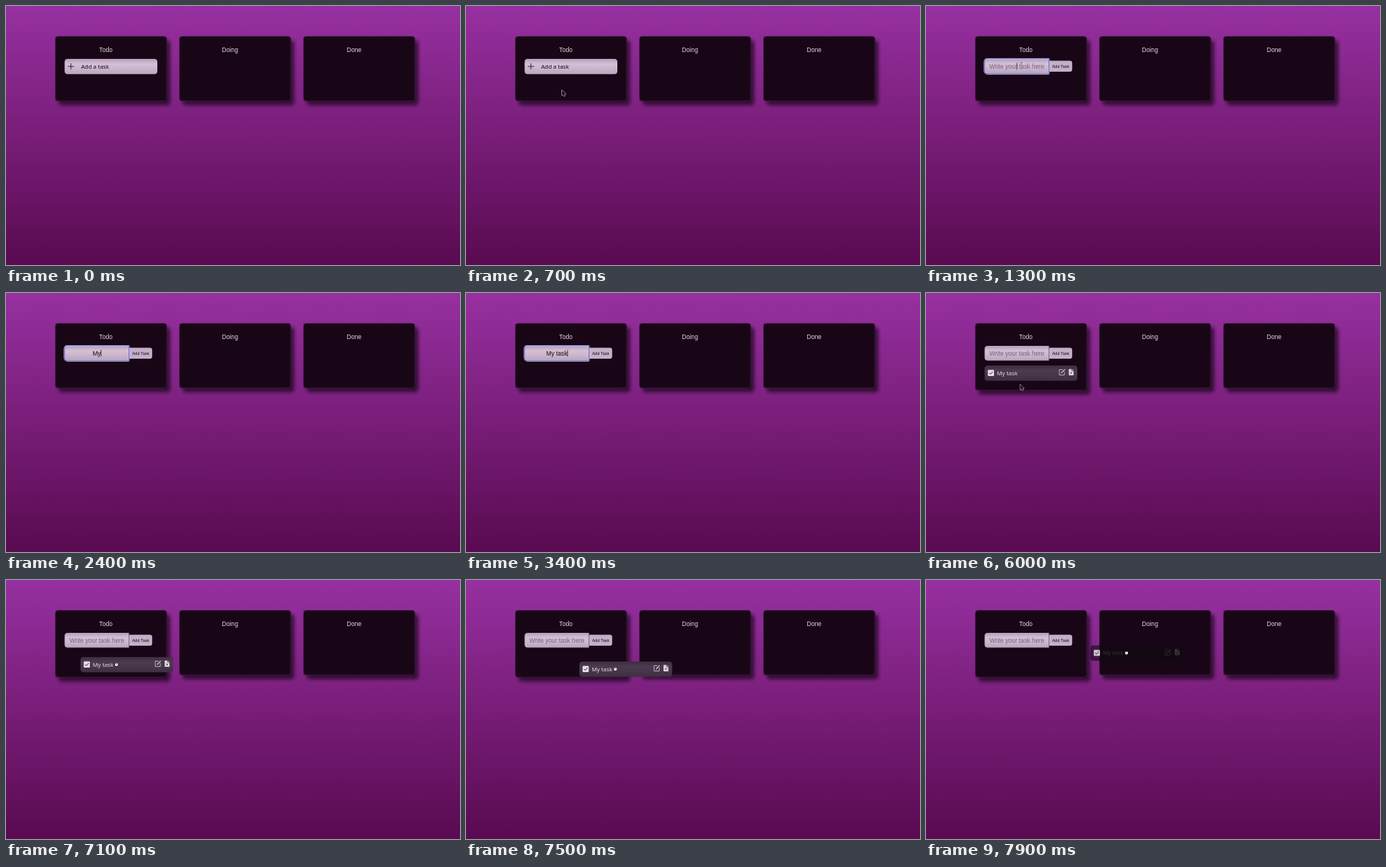
Write an HTML page with a canvas that moves like this. It is 600 px wide and 343 px high and loops after 8000 ms.

```html
<!DOCTYPE html>
<html lang="en">
<head>
<meta charset="utf-8">
<title>Task board</title>
<style>
html, body { margin: 0; width: 100%; height: 100%; overflow: hidden; background: #78207a; }
canvas { display: block; width: 600px; height: 343px; }
</style>
</head>
<body>
<canvas id="stage"></canvas>
<script>
const W = 600, H = 343, LOOP = 8000, STEP = 100;
const SANS = '"Liberation Sans", Arial, sans-serif';
const NOTO = '"Noto Sans", "Open Sans", sans-serif';
const TASK = 'My task';

// Moments of the story, in ms.
const OPEN = 1100, TYPE = 2200, KEY = 150, REACH = 3800, SUBMIT = 4300;
const LEAVE = 5300, BACK = 5800, GRAB = 6500, DRAG = 6800, END = 7900;

const canvas = document.getElementById('stage');
const ctx = canvas.getContext('2d');
const ratio = window.devicePixelRatio || 1;
canvas.width = W * ratio;
canvas.height = H * ratio;
ctx.scale(ratio, ratio);

const part = (t, from, to) => Math.min(1, Math.max(0, (t - from) / (to - from)));
const smooth = p => p * p * (3 - 2 * p);

// The pointer's place is its entry point plus each eased move made so far.
function pointerAt(t) {
  const enter = smooth(part(t, 0, 900));
  const reach = smooth(part(t, REACH, SUBMIT));
  const leave = smooth(part(t, LEAVE, BACK));
  const back = part(t, BACK, 6300);
  return [
    133 - 7 * enter + 42 * reach - 44 * leave + back,
    336 - 257 * enter + 4 * reach + 48 * leave - 25 * back
  ];
}

// The drag speeds up sideways, sinks a little and lifts at the end.
function dragAt(t) {
  const p = part(t, DRAG, END);
  return [140 * p ** 1.46, 22 * p - 31.4 * p ** 6];
}

function vertical(y, h, colors) {
  const g = ctx.createLinearGradient(0, y, 0, y + h);
  colors.forEach((c, i) => g.addColorStop(i / (colors.length - 1), c));
  return g;
}

function box(x, y, w, h, r, fill, stroke, width = 1) {
  ctx.beginPath();
  ctx.roundRect(x, y, w, h, r);
  if (fill) { ctx.fillStyle = fill; ctx.fill(); }
  if (stroke) { ctx.strokeStyle = stroke; ctx.lineWidth = width; ctx.stroke(); }
}

function label(text, x, y, size, color, family = SANS, align = 'left') {
  ctx.font = size + 'px ' + family;
  ctx.textAlign = align;
  ctx.fillStyle = color;
  ctx.fillText(text, x, y);
}

function line(color, width, d) {
  ctx.strokeStyle = color;
  ctx.lineWidth = width;
  ctx.stroke(new Path2D(d));
}

function shape(d, fill, stroke, width) {
  ctx.lineJoin = 'round';
  if (stroke) line(stroke, width, d);
  ctx.fillStyle = fill;
  ctx.fill(new Path2D(d));
}

function column(x, title, h) {
  ctx.save();
  ctx.shadowColor = 'rgba(24, 6, 26, .75)';
  ctx.shadowOffsetX = 4.5 * ratio;
  ctx.shadowOffsetY = 5.5 * ratio;
  ctx.shadowBlur = 5 * ratio;
  box(x, 40, 147.5, h, 4, '#180617');
  ctx.restore();
  box(x + .25, 40.25, 147, h - .5, 4, null, '#4b2450', .6);
  label(title, x + 67, 61, 8.2, '#dcd3dd', SANS, 'center');
}

const light = ['#b49db8', '#d4c0d6', '#c9b4cc', '#bba5bf'];

function addButton() {
  box(77.5, 70, 122.5, 20.3, 4, vertical(70, 20.3, light));
  line('#2a1c2c', .9, 'M81.7 80H90M85.8 75.9V84.1');
  label('Add a task', 99.3, 82.8, 7.5, '#170b18', NOTO);
}

function form(t) {
  const focused = t < SUBMIT;
  const keys = focused ? Math.max(0, Math.ceil((t - TYPE + 1) / KEY)) : 0;
  const text = TASK.slice(0, keys);

  box(162.8, 72.5, 30.4, 14.6, [0, 3, 3, 0], '#c5aec8');
  label('Add Task', 178, 81.7, 5.5, '#150818', SANS, 'center');
  box(77.5, 70, 85, 19.5, [4, 0, 0, 4], vertical(70, 19.5, light));
  if (focused) {
    box(77.3, 69.8, 85.2, 20, [4, 1, 1, 4], null, '#d8d3ee', 1.7);
    box(77.3, 69.8, 85.2, 20, [4, 1, 1, 4], null, '#6670c4', 1.1);
  }
  if (text) label(text, 120, 82.7, 8.15, '#170c19', SANS, 'center');
  else label('Write your task here', 120, 82.7, 8.15, '#75647a', SANS, 'center');

  const typing = keys > 0 && keys <= TASK.length;
  const blink = (t - OPEN) % 1000 < 500;
  if (focused && (typing || blink)) {
    ctx.font = '8.15px ' + SANS;
    const x = 120.2 + ctx.measureText(text).width / 2;
    line('#170c19', .7, `M${x} 75.3V84.2`);
  }
}

function card(dx, dy, faded) {
  const ink = faded ? '#393239' : '#e2d8e4';
  const back = faded ? '#120c12' : '#443247';
  const fill = faded
    ? 'rgba(15, 11, 15, .6)'
    : vertical(0, 20.3, ['#3e2c41', '#4c3a4f', '#473549', '#3f2d42']);
  ctx.save();
  ctx.translate(77.5 + dx, 96 + dy);
  box(0, 0, 122.5, 20.3, 4, fill);

  box(4.2, 5.8, 8.2, 8.2, 1.2, faded ? '#cfc3d0' : '#e6dce8');
  line('#392a3b', 1, 'M6.1 9.9L7.7 11.6L10.7 8.1');
  label(TASK, 16.3, 12.7, 7.5, ink, NOTO);

  // Edit and delete icons.
  line(ink, .7, 'M103 5.5H98.7V12.6H105.5V8.3');
  line(ink, 1.1, 'M101.2 10.2L106 5.2');
  shape('M111.2 4.7H115.2L117.6 7.1V13H111.2Z', ink);
  line(back, .7, 'M115.1 4.7V7.2H117.6M113.1 8.7L115.6 11.2M115.6 8.7L113.1 11.2');
  ctx.restore();
}

const cursors = {
  arrow() {
    shape('M0 0V7.2L1.7 5.7L2.8 8.2L4 7.7L2.9 5.2H5.1Z', '#120812', '#e9e2ea', 1);
  },
  beam() {
    const d = 'M0 -3.8V3.8M-1.4 -4H1.4M-1.4 4H1.4';
    line('#e2d7e4', 1.3, d);
    line('#332636', .6, d);
  },
  hand() {
    shape('M-.5 0Q.3 -.8 .8 0V2.2L3.4 2.8Q4 3 3.9 3.8L3.2 6H.2L-1.9 3.4Q-1.6 2.5 -.5 3.1Z',
      '#e4dbe5', '#1c101e', 1);
  },
  grab() {
    shape('M-1.8 -1.1Q-1.4 -1.8 -.6 -1.5Q0 -2.2 .7 -1.6Q1.5 -1.9 2 -1V.6L1.1 2H-1L-2.1 .5Z',
      '#f4eef5', '#160b18', .8);
    line('#160b18', .4, 'M-.6 -.8V.1M.6 -.8V.1');
  }
};

function cursorKind(t, y) {
  if (t >= GRAB) return 'grab';
  if (t < OPEN) return y < 90 ? 'hand' : 'arrow';
  if (t < 4100) return 'beam';
  if (t < BACK) return y < 87 ? 'hand' : 'arrow';
  return y < 116 ? 'hand' : 'arrow';
}

function pointer(t, dx, dy) {
  const hidden = t < 100 || (t >= TYPE && t < REACH);
  if (hidden) return;
  const [x, y] = pointerAt(t);
  ctx.save();
  ctx.translate(x + dx, y + dy);
  cursors[cursorKind(t, y)]();
  ctx.restore();
}

function draw(t) {
  ctx.fillStyle = vertical(0, H, ['#9730a1', '#590a50']);
  ctx.fillRect(0, 0, W, H);

  ['Todo', 'Doing', 'Done'].forEach((title, i) =>
    column(65 + 164 * i, title, i === 0 && t >= SUBMIT ? 89 : 86));

  if (t < OPEN) addButton();
  else form(t);

  const [dx, dy] = dragAt(t);
  if (t >= SUBMIT) card(dx, dy, dx > 104);
  pointer(t, dx, dy);
}

function tick(now) {
  const t = now % LOOP;
  draw(t - t % STEP);
  requestAnimationFrame(tick);
}
draw(0);
requestAnimationFrame(tick);
</script>
</body>
</html>
```
